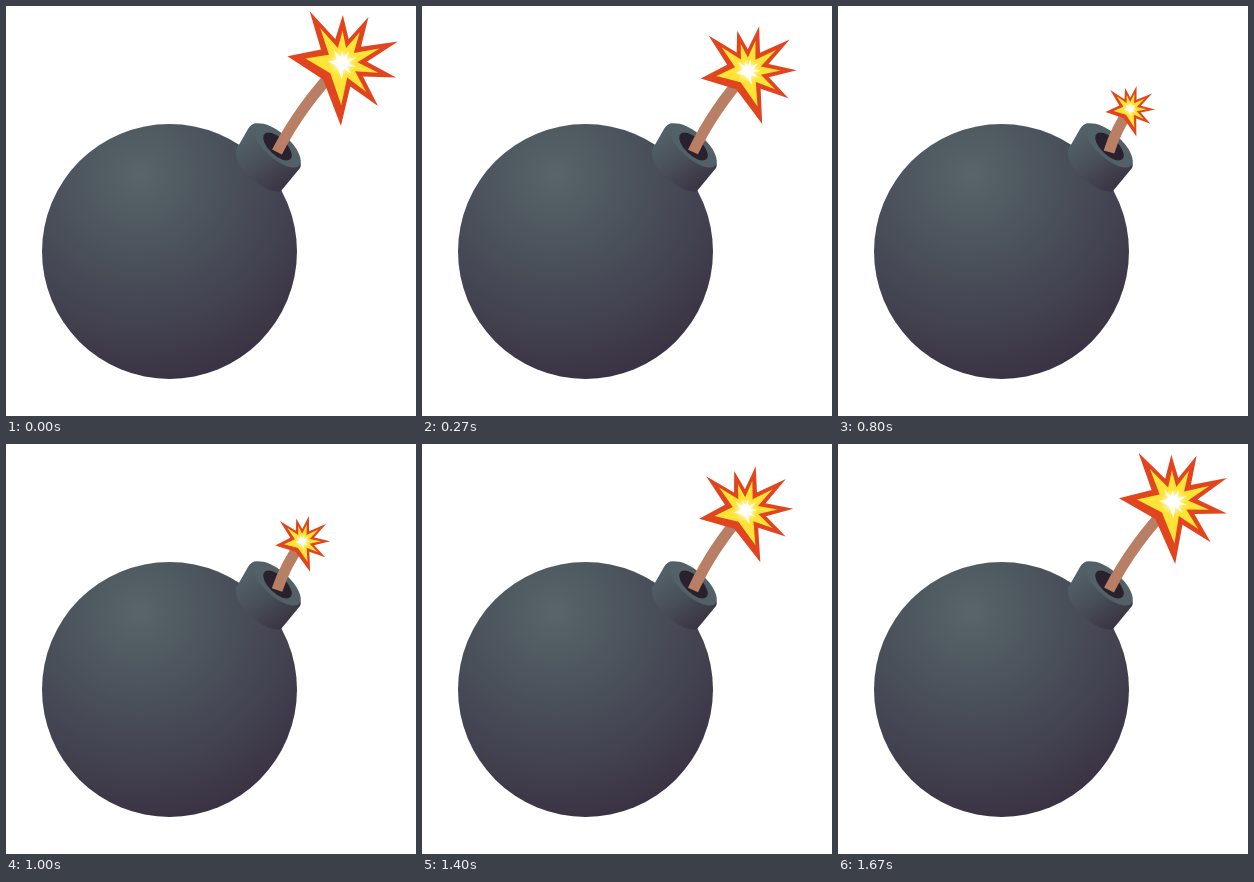
Recreate the animation shown at these times as an HTML page. Size 410 px wide and 410 px high, loop 1.73 s.

```html
<!DOCTYPE html>
<html lang="en">
<head>
<meta charset="utf-8">
<title>Bomb with a burning fuse</title>
<style>
  html, body { margin: 0; width: 100%; height: 100%; overflow: hidden; background: #fff; }
  svg { display: block; width: 100vw; height: 100vh; }
</style>
</head>
<body>
<svg viewBox="0 0 410 410">
  <defs>
    <radialGradient id="body" gradientUnits="userSpaceOnUse" cx="133" cy="168" r="212">
      <stop offset="0" stop-color="#586569"/>
      <stop offset=".35" stop-color="#4c545d"/>
      <stop offset=".7" stop-color="#434351"/>
      <stop offset="1" stop-color="#3a3242"/>
    </radialGradient>
    <linearGradient id="side" gradientUnits="userSpaceOnUse" x1="238" y1="132" x2="276" y2="184">
      <stop offset="0" stop-color="#526067"/>
      <stop offset=".5" stop-color="#484d58"/>
      <stop offset="1" stop-color="#3a3343"/>
    </linearGradient>
    <linearGradient id="rim" gradientUnits="userSpaceOnUse" x1="247" y1="120" x2="295" y2="160">
      <stop offset="0" stop-color="#526067"/>
      <stop offset="1" stop-color="#444652"/>
    </linearGradient>
    <radialGradient id="glow">
      <stop offset="0" stop-color="#fff"/>
      <stop offset=".4" stop-color="#fff" stop-opacity=".7"/>
      <stop offset="1" stop-color="#fff7a0" stop-opacity="0"/>
    </radialGradient>
  </defs>

  <circle cx="163.5" cy="245.5" r="127.5" fill="url(#body)"/>
  <path d="M253 117.5Q246 116 242 123L230 144C226 162 262 190 275 185L294 162Q296 158 293 154Z" fill="url(#side)"/>
  <ellipse rx="30" ry="12.5" transform="translate(271 139.5) rotate(42)" fill="url(#rim)"/>
  <ellipse rx="18" ry="8.5" transform="translate(271.5 140.5) rotate(44)" fill="#29222e"/>
  <path id="fuse" fill="none" stroke="#b87f64" stroke-width="11"/>
  <g id="spark">
    <path id="flame" fill="#e04520"/>
    <path id="blaze" fill="#ffe336"/>
    <path id="core" fill="#fff"/>
    <circle r="14" fill="url(#glow)"/>
  </g>
</svg>
<script>
const LOOP = 1730, STEPS = 26, FPS = 15;

// Spike tips: clockwise angle from straight up, radius
const tips = [[-32, 61], [1, 48], [30, 53], [69, 60],
              [105, 56], [140, 56], [181, 63], [277, 55]];

// Spark poses on the way down: step, x, y, scale, rotation
const poses = [
  [0, 336, 57, 1, 0],
  [1, 335, 58, .985, -3],
  [4, 326, 65, .87, -16],
  [5, 323.5, 66.5, .855, -17],
  [8, 309, 81, .64, -20],
  [12, 292, 103, .45, -14],
  [13, 291, 105, .44, -13]
];

const byId = id => document.getElementById(id);

const polar = (angle, radius) => {
  const a = angle * Math.PI / 180;
  return `${(radius * Math.sin(a)).toFixed(2)} ${(-radius * Math.cos(a)).toFixed(2)}`;
};

const starPath = (tipScale, valley) => "M" + tips.map(([angle, radius], i) => {
  const next = i + 1 < tips.length ? tips[i + 1][0] : tips[0][0] + 360;
  return polar(angle, radius * tipScale) + "L" + polar((angle + next) / 2, valley);
}).join("L") + "Z";

byId("flame").setAttribute("d", starPath(1, 25));
byId("blaze").setAttribute("d", starPath(.67, 15.5));
byId("core").setAttribute("d", starPath(.26, 6));
const fuse = byId("fuse"), spark = byId("spark");

function poseAt(step) {
  const end = Math.max(1, poses.findIndex(pose => pose[0] >= step));
  const from = poses[end - 1], to = poses[end];
  const k = (step - from[0]) / (to[0] - from[0]);
  return from.map((value, i) => value + (to[i] - value) * k);
}

// Step starts are rounded to 10 ms
function stepAt(time) {
  let step = STEPS - 1;
  while (Math.round(step * 100 / FPS) * 10 > time) step--;
  return step;
}

function draw(now) {
  const step = stepAt(now % LOOP);
  const [, x, y, scale, turn] = poseAt(Math.min(step, STEPS - step));
  const bendX = (271 + x) / 2 - 8 * scale, bendY = (146 + y) / 2 - 3 * scale;
  fuse.setAttribute("d", `M271 146Q${bendX} ${bendY} ${x} ${y}`);
  spark.setAttribute("transform", `translate(${x} ${y}) rotate(${turn}) scale(${scale})`);
}

const start = performance.now();
function tick() {
  draw(performance.now() - start);
  requestAnimationFrame(tick);
}
tick();
</script>
</body>
</html>
```
